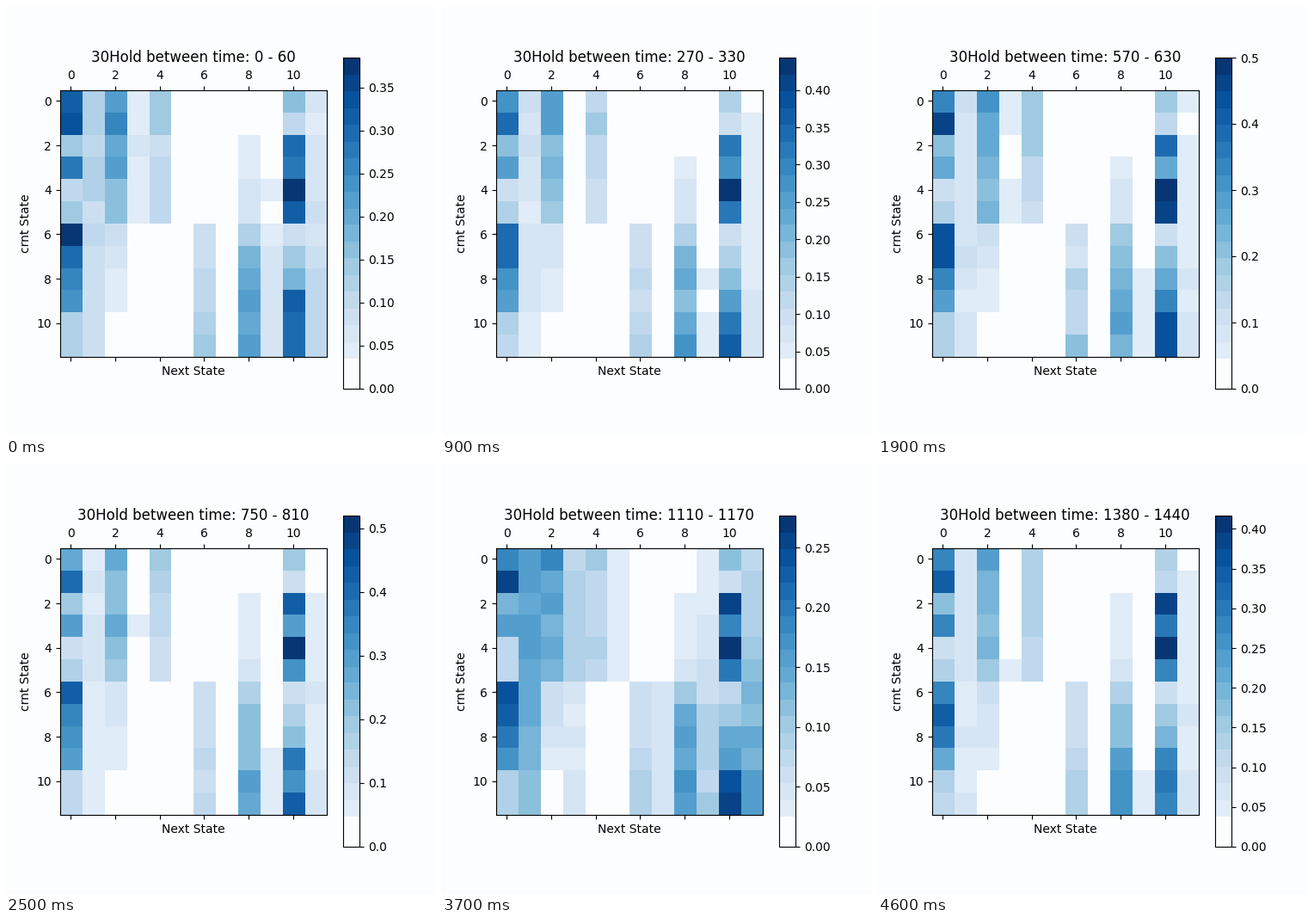
A matplotlib script for the animation above (4.7 s loop, 500 px wide and 500 px high).

```python
import numpy as np
import matplotlib.pyplot as plt
from matplotlib.animation import FuncAnimation
from matplotlib.colors import ListedColormap

FRAMES, STEP, WINDOW = 47, 30, 60
STATES, HALF = 12, 6
PAPER = (252 / 255, 253 / 255, 1, 1)

# Key moments: top of the colour scale, and how far moves spill to odd states
KEYS = [0, 5, 13, 25, 32, 37, 46]
PEAKS = [.3846, .4067, .48, .52, .4828, .2769, .4167]
SPILL = [.52, .32, .36, .34, .1, 1.05, .3]


def ramp(start, end, n=HALF):
    return np.linspace(start, end, n)


def typical_moves():
    """Usual strength of each move, as a share of the strongest one."""
    moves = np.zeros((STATES, STATES))
    upper, lower = moves[:HALF], moves[HALF:]

    # Every state is drawn to 0 and 10
    moves[:, 0] = [.65, .79, .39, .59, .24, .32, .80, .79, .59, .56, .29, .27]
    moves[:, 10] = [.37, .24, .77, .57, 1, .72, .21, .37, .47, .66, .76, .74]

    # The upper half also moves to 2 and 4, the lower half to 6 and 8
    upper[:, 2] = ramp(.56, .38)
    lower[:, 2] = ramp(.20, .04)
    upper[:, 4] = ramp(.32, .23)
    lower[:, 6] = ramp(.19, .33)
    upper[:, 8] = ramp(.05, .15)
    lower[:, 8] = ramp(.37, .58)

    # Weak moves to odd states
    moves[:, 1] = ramp(.52, .38, STATES)
    upper[:, 3], lower[:, 3] = .25, .12
    upper[:, 5] = .09
    lower[:, 7] = .13
    moves[:, 9] = ramp(.08, .32, STATES)
    moves[:, 11] = ramp(.26, .48, STATES)
    return moves


def banded_blues(floor=.09, bands=18):
    """Blues in flat steps, with the lowest values left as paper."""
    x = np.linspace(0, 1, 256)
    width = (1 - floor) / bands
    level = np.minimum((x - floor) // width, bands - 1)
    colors = plt.get_cmap("Blues")(floor + (level + .5) * width)
    colors[x < floor] = PAPER
    return ListedColormap(colors)


MOVES = typical_moves()
NOISE = np.random.default_rng(30).normal(0, .14, (FRAMES + 1, STATES, STATES))


def matrix(i):
    share = MOVES.copy()
    share[:, 1::2] *= np.interp(i, KEYS, SPILL)
    # Each window covers two steps, so neighbours share half their noise
    share *= 1 + (NOISE[i] + NOISE[i + 1]) / 2
    peak = np.interp(i, KEYS, PEAKS)
    return peak * share / share.max(), peak


fig, ax = plt.subplots(figsize=(5, 5), dpi=100, facecolor=PAPER)
image = ax.matshow(matrix(0)[0], cmap=banded_blues(), vmin=0)
fig.colorbar(image)
ax.set_xlabel("Next State")
ax.set_ylabel("crnt State")
title = ax.set_title("")


def update(i):
    data, peak = matrix(i)
    image.set_data(data)
    image.set_clim(0, peak)
    start = i * STEP
    title.set_text(f"30Hold between time: {start} - {start + WINDOW}")
    return image, title


anim = FuncAnimation(fig, update, frames=FRAMES, interval=100,
                     repeat=True, repeat_delay=0, blit=False)
plt.show()
```
